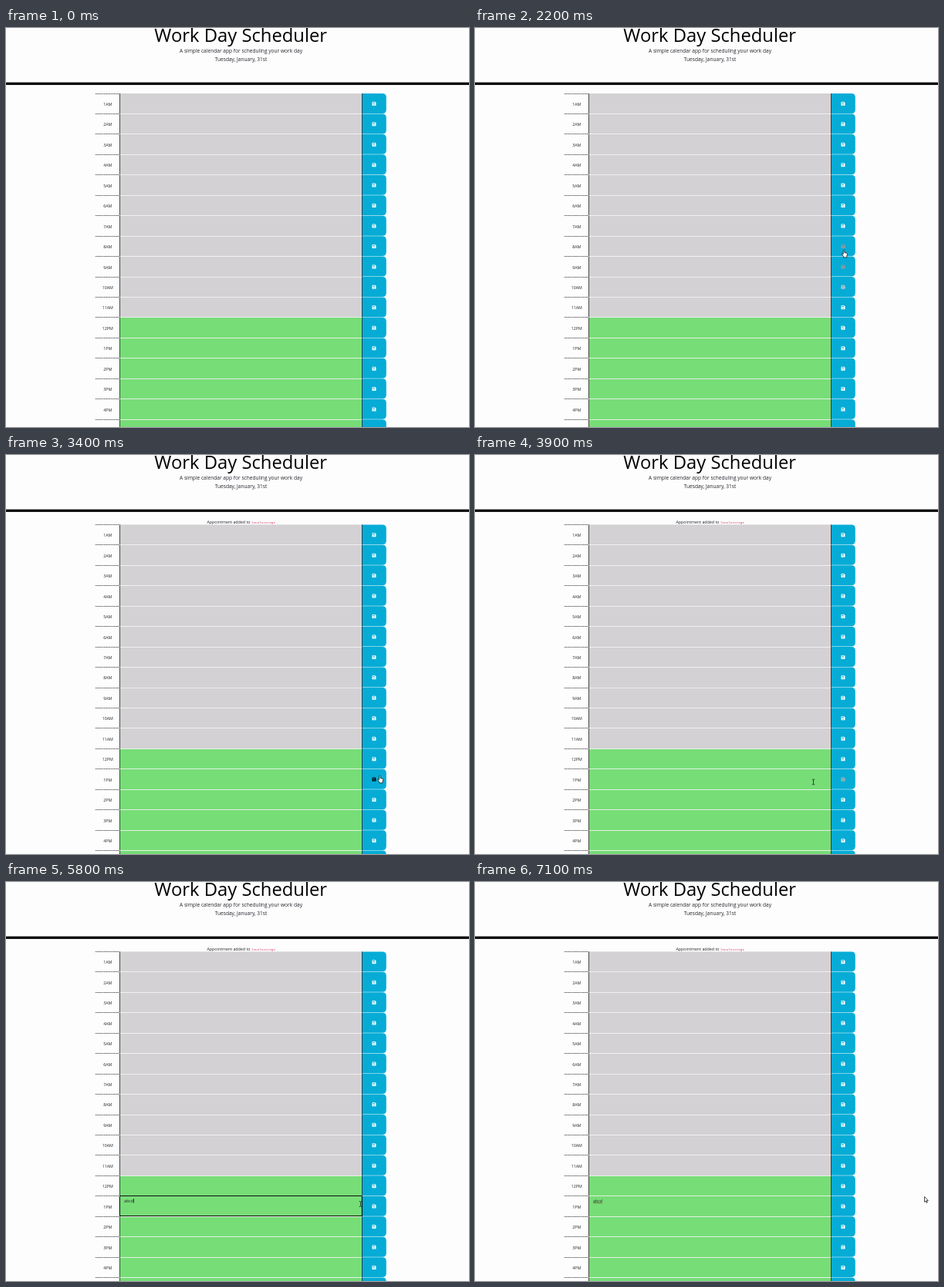
Animation, 600 px wide and 518 px high, one loop 7.2 s. Source, as an HTML page:

```html
<!DOCTYPE html>
<html lang="en">
<head>
<meta charset="utf-8">
<title>Work Day Scheduler</title>
<style>
  html, body { margin: 0; width: 100%; height: 100%; overflow: hidden; background: #fefdfe; }
  svg { display: block; width: 600px; height: 518px; }
  text { font-family: "Open Sans", sans-serif; font-size: 5.3px; fill: #212529; }
  .mid { text-anchor: middle; }
  .title { font-size: 23.8px; fill: #000; }
  .lead { font-size: 6.6px; }
  .code { font-family: "Liberation Mono", monospace; font-size: 4.35px; fill: #d6456f; }
</style>
</head>
<body>
<svg id="stage" viewBox="0 0 600 518"></svg>
<script>
const LOOP = 7200, STEP = 100;
const ROW = 26.45, TOP = 85, SHIFT = 5.4;
const LEFT = 116, FIELD = 147.3, SAVE = 461.3, RIGHT = 492.8, MIDDLE = 304.5;
const MESSAGE_AT = 3400, FOCUS_AT = 5000, BLUR_AT = 6200;
const EDITED = 12; // the 1PM row

// Pointer hotspot: time, x, y
const PATH = [
  [600, 544, 502], [1100, 501, 403.5], [1300, 487, 417], [1600, 480, 407],
  [1700, 480, 407], [2100, 478, 291], [2200, 478, 288], [2300, 482, 302],
  [2500, 487, 396], [2800, 485, 498], [3100, 485, 416], [3500, 484, 416],
  [3900, 438.5, 424.5], [4000, 432, 424], [4400, 438, 422], [4600, 438, 422],
  [5000, 445, 420], [5700, 445, 420], [5800, 459.5, 418], [6000, 477, 418],
  [6200, 479, 418], [6500, 531, 415], [7100, 582.5, 408.5]
];

function pointer(t) {
  if (t < PATH[0][0]) return null;
  const i = PATH.findIndex(p => p[0] > t);
  if (i < 0) return PATH.at(-1).slice(1);
  const [t0, x0, y0] = PATH[i - 1], [t1, x1, y1] = PATH[i];
  const k = (t - t0) / (t1 - t0);
  return [x0 + (x1 - x0) * k, y0 + (y1 - y0) * k];
}

const gridTop = t => t >= MESSAGE_AT ? TOP + SHIFT : TOP;

function hoveredRow(t) {
  const p = pointer(t);
  if (!p || p[0] < SAVE || p[0] > RIGHT) return -1;
  return Math.floor((p[1] - gridTop(t)) / ROW);
}

// Share of the last 300 ms that the pointer spent on a row's button
function hoverAmount(row, t) {
  let hits = 0;
  for (let i = 0; i < 10; i++) hits += hoveredRow(t - i * 30) === row;
  return hits / 10;
}

const rect = (x, y, w, h, fill, more = "") =>
  `<rect x="${x}" y="${y}" width="${w}" height="${h}" fill="${fill}" ${more}/>`;
const text = (x, y, s, cls = "") => `<text x="${x}" y="${y}" class="${cls}">${s}</text>`;
const path = (d, more) => `<path d="${d}" ${more}/>`;

function icon(y, dark) {
  const c = Math.round(255 * (1 - dark));
  return `<g transform="translate(474.5 ${y})">` +
    path("M.5 0H3.8L5 1.2V4.5Q5 5 4.5 5H.5Q0 5 0 4.5V.5Q0 0 .5 0Z", `fill="rgb(${c},${c},${c})"`) +
    rect(.8, .8, 2.6, 1.1, "#06acd6") +
    `<circle cx="2.5" cy="3.4" r=".75" fill="#06acd6"/></g>`;
}

function row(i, t) {
  const y = gridTop(t) + i * ROW, line = Math.floor(y) + .5;
  const h = ROW - .5, r = 5;
  const label = (i % 12 + 1) + (i < 11 ? "AM" : "PM");
  return path(`M${LEFT} ${line}H${FIELD}`, 'stroke="#444" stroke-width=".9" stroke-dasharray="1.4 .8"') +
    text(131.8, y + 15.9, label, "mid") +
    rect(FIELD, y, SAVE - FIELD, ROW, i < 11 ? "#d3d1d3" : "#77dd77") +
    (i ? path(`M${FIELD} ${line}H${SAVE}`, 'stroke="#f6f5f6" stroke-width=".8"') : "") +
    path(`M${SAVE} ${y}H${RIGHT - r}q${r} 0 ${r} ${r}V${y + h - r}q0 ${r} ${-r} ${r}H${SAVE}Z`, 'fill="#06acd6"') +
    path(`M147.5 ${y}v${ROW}M461.5 ${y}v${ROW}`, 'stroke="#222" stroke-width=".8"') +
    icon(y + 10.8, hoverAmount(i, t));
}

function entry(t) {
  const y = gridTop(t) + EDITED * ROW;
  const typed = t < 5400 ? "" : "abcd".slice(0, 2 + (t - 5400) / STEP);
  const focused = t >= FOCUS_AT && t < BLUR_AT;
  let out = text(153, y + 8, typed);
  if (focused) {
    out += rect(147.4, Math.floor(y) + .5, 314, 26, "none", 'rx="1" stroke="#101010" stroke-width="1.1"');
    const caret = 153.2 + [0, 0, 5.9, 8.5, 11.8][typed.length];
    if (t < 6100) out += rect(caret, y + 3.4, .6, 5.6, "#000");
  } else if (t >= BLUR_AT) {
    out += path(`M153 ${y + 9}q.75 -.8 1.5 0` + "t1.5 0".repeat(7), 'fill="none" stroke="#7a3328" stroke-width=".6"');
  }
  return out;
}

const SHAPES = {
  arrow: "M0 0V7L1.6 5.5L2.7 8L3.8 7.5L2.7 5.1H4.8Z",
  hand: "M-.8 .6Q0 -.5 .8 .6V3.6L3.6 4.2Q4.6 4.5 4.5 5.6L3.8 8.2V9.8H-.5V8.6L-2.6 5.6Q-2.6 4.5 -1.6 5L-.8 5.8Z",
  beam: "M-1.7 -3.3H-.5L0 -2.8L.5 -3.3H1.7M0 -2.8V2.8M-1.7 3.3H-.5L0 2.8L.5 3.3H1.7"
};

function cursor(t) {
  const p = pointer(t);
  if (!p) return "";
  const [x, y] = p;
  const kind = x < FIELD || x > RIGHT ? "arrow" : x < SAVE ? "beam" : "hand";
  const fill = kind === "beam" ? "none" : "#fff";
  return path(SHAPES[kind], `transform="translate(${x} ${y})" fill="${fill}" stroke="#111" stroke-width=".75" stroke-linejoin="round"`);
}

function draw(t) {
  let out = text(MIDDLE - .3, 18, "Work Day Scheduler", "mid title") +
    text(MIDDLE, 31.8, "A simple calendar app for scheduling your work day", "mid lead") +
    text(MIDDLE, 43.4, "Tuesday, January, 31st", "mid lead") +
    rect(0, 70.6, 600, 3.3, "#000");
  if (t >= MESSAGE_AT)
    out += text(260.5, 89.2, "Appointment added to") + text(317.8, 89.2, "localStorage", "code");
  for (let i = 0; i < 17; i++) out += row(i, t);
  stage.innerHTML = out + entry(t) + cursor(t);
}

const stage = document.getElementById("stage");
const start = performance.now();
let shown = -1;
function tick() {
  const t = Math.floor((performance.now() - start) % LOOP / STEP) * STEP;
  if (t !== shown) draw(shown = t);
  requestAnimationFrame(tick);
}
tick();
</script>
</body>
</html>
```
